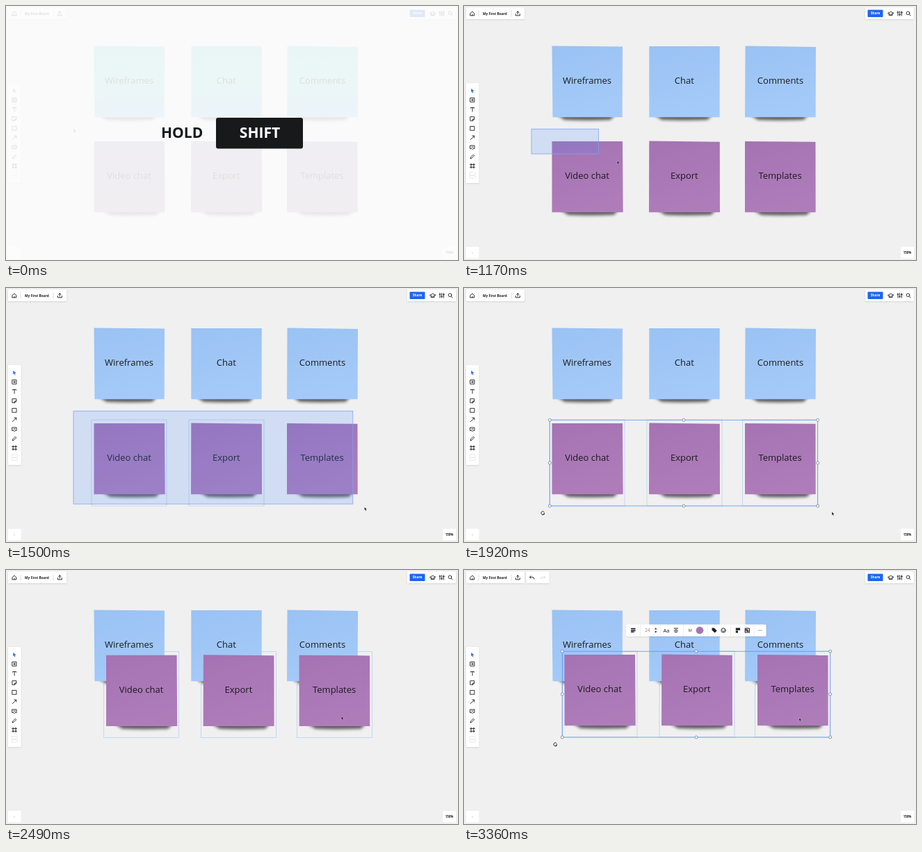
An HTML page that plays this animation: 650 px wide and 366 px high, repeating every 3.39 s.

```html
<!DOCTYPE html>
<html lang="en">
<head>
<meta charset="utf-8">
<title>Hold Shift to select</title>
<style>
  html, body { margin: 0; width: 650px; height: 366px; overflow: hidden; background: #f0f0f0; }
  svg { display: block; font-family: "Open Sans", "Noto Sans", sans-serif; }
  .note text { font-size: 13px; text-anchor: middle; fill: #1c1c1e; }
  .panel { fill: #fff; filter: url(#lift); }
  .icons { fill: none; stroke: #1b1c22; stroke-width: .9; stroke-linejoin: round; stroke-linecap: round; }
  .solid { fill: #1b1c22; stroke: none; }
  .label { font-size: 4.8px; font-weight: 700; fill: #1b1c22; }
  .faint { stroke: #d9d9de; }
  .outline { fill: none; stroke: #a9c4f3; stroke-width: .6; }
  .frame { fill: none; stroke: #5c92f2; stroke-width: .8; }
  .handle { fill: #fff; stroke: #5f6f8d; stroke-width: .7; }
  #marquee { fill: rgba(75,140,250,.19); stroke: #7ea6ee; stroke-width: .8; }
  #title text { font-size: 21px; font-weight: 700; }
</style>
</head>
<body>
<svg width="650" height="366" viewBox="0 0 650 366">
  <defs>
    <linearGradient id="blue" x2=".3" y2="1"><stop stop-color="#9ac2f3"/><stop offset="1" stop-color="#a3caf8"/></linearGradient>
    <linearGradient id="purple" x2=".3" y2="1"><stop stop-color="#a572b3"/><stop offset="1" stop-color="#af7cba"/></linearGradient>
    <linearGradient id="paleBlue" x2="0" y2="1"><stop stop-color="#77d4c8"/><stop offset="1" stop-color="#80cbeb"/></linearGradient>
    <linearGradient id="palePurple" x2="0" y2="1"><stop stop-color="#9c90b4"/><stop offset="1" stop-color="#ad94b4"/></linearGradient>
    <filter id="soft" x="-20%" y="-150%" width="140%" height="400%"><feGaussianBlur stdDeviation="1.9"/></filter>
    <filter id="lift" x="-30%" y="-30%" width="160%" height="160%"><feDropShadow dx="0" dy=".8" stdDeviation="1.2" flood-opacity=".13"/></filter>
  </defs>
  <rect width="650" height="366" fill="#f0f0f0"/>

  <g id="still"></g>
  <g id="group"></g>
  <rect id="marquee"/>

  <g>
    <rect class="panel" x="3" y="2" width="84" height="17" rx="1"/>
    <rect class="panel" x="577" y="2" width="70" height="17" rx="1"/>
    <rect class="panel" x="3" y="111" width="18.5" height="144" rx="1"/>
    <rect x="3" y="347" width="18.5" height="16.5" fill="#fff"/>
    <rect x="628" y="347" width="19" height="16.5" fill="#fff"/>
    <rect x="580.5" y="5.5" width="22" height="10.5" rx="1" fill="#1d66f2"/>
    <text x="591.5" y="12.4" text-anchor="middle" class="label" style="fill:#fff">Share</text>
    <text x="27" y="12.6" class="label">My First Board</text>
    <text x="637.5" y="357" text-anchor="middle" class="label" style="font-size:4.4px">150%</text>
    <text x="12" y="357" text-anchor="middle" style="font-size:6px;fill:#c6c6cc">«</text>

    <g class="icons">
      <path class="faint" d="M21 7v8M68 7v8"/>
      <path d="M9.2 10.5L12 8l2.8 2.5v3.3H9.2zM12 13.6v-1.8"/>
      <path d="M77.3 12V7.8M75.6 9.4l1.7-1.7L79 9.4M74.3 11.5v2.3h6v-2.3"/>
      <path d="M609.8 10.2l4-2 4 2-4 2zM611.3 11.3v2.3h4.6v-2.3"/>
      <path d="M624 7.5v6.5M626.7 7.5v6.5M629.4 7.5v6.5M623 9.2h2M625.700 12.300h2M628.400 9.500h2"/>
      <circle cx="638.5" cy="10.200" r="2.300"/><path d="M640.200 12l1.900 1.900"/>
      <path d="M10.300 119l4.200 3.500-2 .3 1 2.400-1 .4-1-2.400-1.200 1.200z" fill="#2468f2" stroke="none"/>
      <rect x="9.200" y="132.500" width="5.800" height="5.800"/><path d="M12.100 134v2.800M10.700 135.400h2.800"/>
      <path d="M9.600 147.200v-.8h5v.8M12.100 146.500v5.500"/>
      <path d="M9.300 159.700h5.600v3.300l-2.400 2.300H9.300zM14.800 163h-2.300v2.200"/>
      <rect x="9.200" y="173.400" width="5.800" height="5.800"/>
      <path d="M9.300 192.600l5.400-5.400M11.800 187h3v3"/>
      <path d="M9.100 201h6v4.500h-2l-1 1.200-1-1.200h-2zM10.900 203.200h2.400"/>
      <path d="M9.400 219.700l.5-2 3.500-3.500 1.400 1.400-3.500 3.500z"/>
      <path d="M10.200 227v6.800M14 227v6.800M8.700 228.500h6.800M8.700 232.300h6.800"/>
      <rect class="faint" x="8" y="240" width="8.200" height="8.200" rx="1" stroke-width=".6"/>
      <path d="M10.300 244.200h.1M12.100 244.200h.1M13.900 244.200h.1" stroke="#aaaab2"/>
    </g>

    <g id="undo" class="icons">
      <rect class="panel" x="89.500" y="2" width="33" height="17" rx="1" stroke="none"/>
      <path d="M96.200 8.600l-1.800 1.700 1.800 1.700M94.700 10.300h4.200q1.900 0 2 2.700"/>
      <path class="faint" d="M115 8.600l1.800 1.700-1.800 1.700M116.500 10.300h-4.200q-1.900 0-2 2.700"/>
    </g>

    <g id="toolbar" class="icons">
      <rect class="panel" x="233" y="78.500" width="201.500" height="17" rx="1.500" stroke="none"/>
      <path class="faint" stroke-width=".5" d="M253.500 79v16M283 79v16M315.500 79v16M350 79v16M383.500 79v16M417 79v16"/>
      <path d="M240.500 84.300h5.600M240.500 86h5.600M240.500 87.700h5.600M240.500 89.400h3.600" stroke-width="1.200"/>
      <text x="264" y="89.400" text-anchor="middle" stroke="none" font-size="6.500" fill="#85858c">24</text>
      <path class="solid" d="M274 85.500l1.700-2.200 1.700 2.200zM274 88.300l1.700 2.200 1.700-2.200z"/>
      <text x="291" y="89.600" text-anchor="middle" stroke="none" font-size="7.500" fill="#1b1c22">Aa</text>
      <path d="M302 84h5.600M303.300 85.900h3M302 87.800h5.600M303.300 89.700h3"/>
      <text x="325.300" y="89.200" text-anchor="middle" stroke="none" font-size="6" fill="#33343a">M</text>
      <circle cx="339" cy="87" r="5" fill="#a674b5" stroke="#8f629e" stroke-width=".5"/>
      <path class="solid" d="M356.500 83.500h3.200l4 3.900-3.100 3.100-4.100-3.900z"/>
      <circle cx="373" cy="87" r="3.200"/><path d="M371.500 87.900q1.500 1.800 3 0M371.900 86h.1M374.100 86h.1"/>
      <path class="solid" d="M390.800 83.500h6.300v3.200h-6.300zM390.800 87.500h3.200v3h-3.200z"/>
      <rect x="404.300" y="84" width="6" height="6" stroke-width="1.100"/><path d="M405.900 85.600h1.600v1.600h-1.600zM407.200 87h1.600v1.600h-1.600z"/>
      <path d="M424 87h.1M426 87h.1M428 87h.1"/>
    </g>
  </g>

  <path id="cursor" d="M0 0v4.700l1.100-.9.8 1.900 1-.4-.8-1.900h1.500z" fill="#111" stroke="#fff" stroke-width=".35"/>

  <g id="title">
    <rect width="650" height="366" fill="#fcfcfc" opacity=".87"/>
    <text x="223" y="190" fill="#17191b">HOLD</text>
    <rect x="302" y="161" width="125" height="44.500" rx="3" fill="#17191b"/>
    <text x="365" y="190" text-anchor="middle" fill="#fff">SHIFT</text>
  </g>
</svg>
<script>
const LOOP = 3390, BOARD = 690, PRESS = 930, RELEASE = 1650, GRAB = 2310, DROP = 2580, MENU = 2640;
const LAG = 30;
const $ = id => document.getElementById(id);

function add(parent, tag, attrs, text) {
  const node = document.createElementNS('http://www.w3.org/2000/svg', tag);
  for (const key in attrs) node.setAttribute(key, attrs[key]);
  if (text) node.textContent = text;
  return parent.appendChild(node);
}
const show = (node, on) => node.setAttribute('visibility', on ? 'visible' : 'hidden');
const move = (node, x, y) => node.setAttribute('transform', `translate(${x} ${y})`);

// label, left, top, then corner shifts: top-left y, top-right y, bottom-right x, bottom-left x
const blueNotes = [
  ['Wireframes', 126.5, 58, -.5, .5, -.3, 1],
  ['Chat', 266.3, 58, 0, 0, -.2, 0],
  ['Comments', 404.5, 58, -.5, 1, -.3, -.5]
];
const purpleNotes = [
  ['Video chat', 126.5, 195, 0, 0, .7, 0],
  ['Export', 266.3, 195, -.5, .7, .2, -.3],
  ['Templates', 404, 195, 0, .8, .2, 0]
];
const papers = [];

function addNote(parent, color, [label, x, y, tl, tr, br, bl]) {
  const g = add(parent, 'g', { class: 'note' });
  move(g, x, y);
  const shade = color === 'blue' ? 0 : 5;
  add(g, 'path', { d: `M${6 + shade} 98H${91 + shade}L${84 + shade} 106Q50 107.500 ${18 + shade} 106z`, fill: '#000', opacity: .62, filter: 'url(#soft)' });
  const paper = add(g, 'path', { d: `M0 ${tl}L101.500 ${tr}L${101.5 + br} 102.300L${bl} 102.300z` });
  add(g, 'text', { x: 50.5, y: 54 }, label);
  papers.push({ paper, color });
}

blueNotes.forEach(n => addNote($('still'), 'blue', n));
purpleNotes.forEach(n => addNote($('group'), 'purple', n));

const outlines = [123, 263, 400.7].map(x => ({
  right: x + 108,
  node: add($('group'), 'rect', { class: 'outline', x, y: 190, width: 108, height: 124 })
}));

const frame = add($('group'), 'g');
add(frame, 'rect', { class: 'frame', x: 123.3, y: 190.2, width: 385.4, height: 123.8 });
for (const x of [123.3, 316, 508.7])
  for (const y of [190.2, 252, 314])
    if (x !== 316 || y !== 252) add(frame, 'circle', { class: 'handle', cx: x, cy: y, r: 2 });
add(frame, 'path', { d: 'M115 326a2.400 2.400 0 1 1 .2-3.200M115.400 323.800v2.400h-2.200', fill: 'none', stroke: '#1b1c22', 'stroke-width': .9 });

const path = [
  [PRESS, 97.3, 177], [1130, 185, 210], [1320, 379, 279.5], [1500, 515, 315.5], [1620, 529, 322.5],
  [1950, 529, 322.5], [2240, 464, 286], [GRAB, 464, 286], [2460, 481.5, 214], [2520, 482, 213]
];

// Smooth curve through the points that rests wherever the motion stops.
function along(t, axis) {
  const last = path.length - 1;
  if (t <= path[0][0]) return path[0][axis];
  if (t >= path[last][0]) return path[last][axis];
  const i = path.findIndex(p => p[0] > t) - 1;
  const slope = k => {
    if (k === 0 || k === last) return 0;
    const [a, b, c] = [path[k - 1], path[k], path[k + 1]];
    return (b[axis] - a[axis]) * (c[axis] - b[axis]) > 0 ? (c[axis] - a[axis]) / (c[0] - a[0]) : 0;
  };
  const [p, q] = [path[i], path[i + 1]];
  const span = q[0] - p[0], u = (t - p[0]) / span, v = 1 - u;
  return v * v * ((1 + 2 * u) * p[axis] + u * span * slope(i))
       + u * u * ((1 + 2 * v) * q[axis] - v * span * slope(i + 1));
}

let wasTitle;
function draw(t) {
  const title = t < BOARD;
  if (title !== wasTitle) {
    show($('title'), title);
    for (const { paper, color } of papers)
      paper.setAttribute('fill', title ? `url(#pale${color[0].toUpperCase() + color.slice(1)})` : `url(#${color})`);
    wasTitle = title;
  }
  move($('cursor'), along(t, 1), along(t, 2));

  const dragging = t > PRESS + LAG && t < RELEASE;
  const right = along(t - LAG, 1), bottom = along(t - LAG, 2);
  show($('marquee'), dragging);
  if (dragging) {
    const box = { x: 97, y: 177.2, width: Math.max(0, right - 97), height: Math.max(0, bottom - 177.2) };
    for (const key in box) $('marquee').setAttribute(key, box[key]);
  }

  const selected = t >= RELEASE;
  for (const o of outlines)
    show(o.node, selected || dragging && right > o.right - 3 && bottom > 311);
  show(frame, selected && (t < GRAB || t >= DROP));
  if (t < GRAB) move($('group'), 0, 0);
  else move($('group'), along(t - LAG, 1) - 464, along(t - LAG, 2) - 286);

  show($('undo'), t >= MENU);
  show($('toolbar'), t >= MENU);
}

const start = performance.now();
function tick() {
  draw((performance.now() - start) % LOOP);
  requestAnimationFrame(tick);
}
tick();
</script>
</body>
</html>
```
